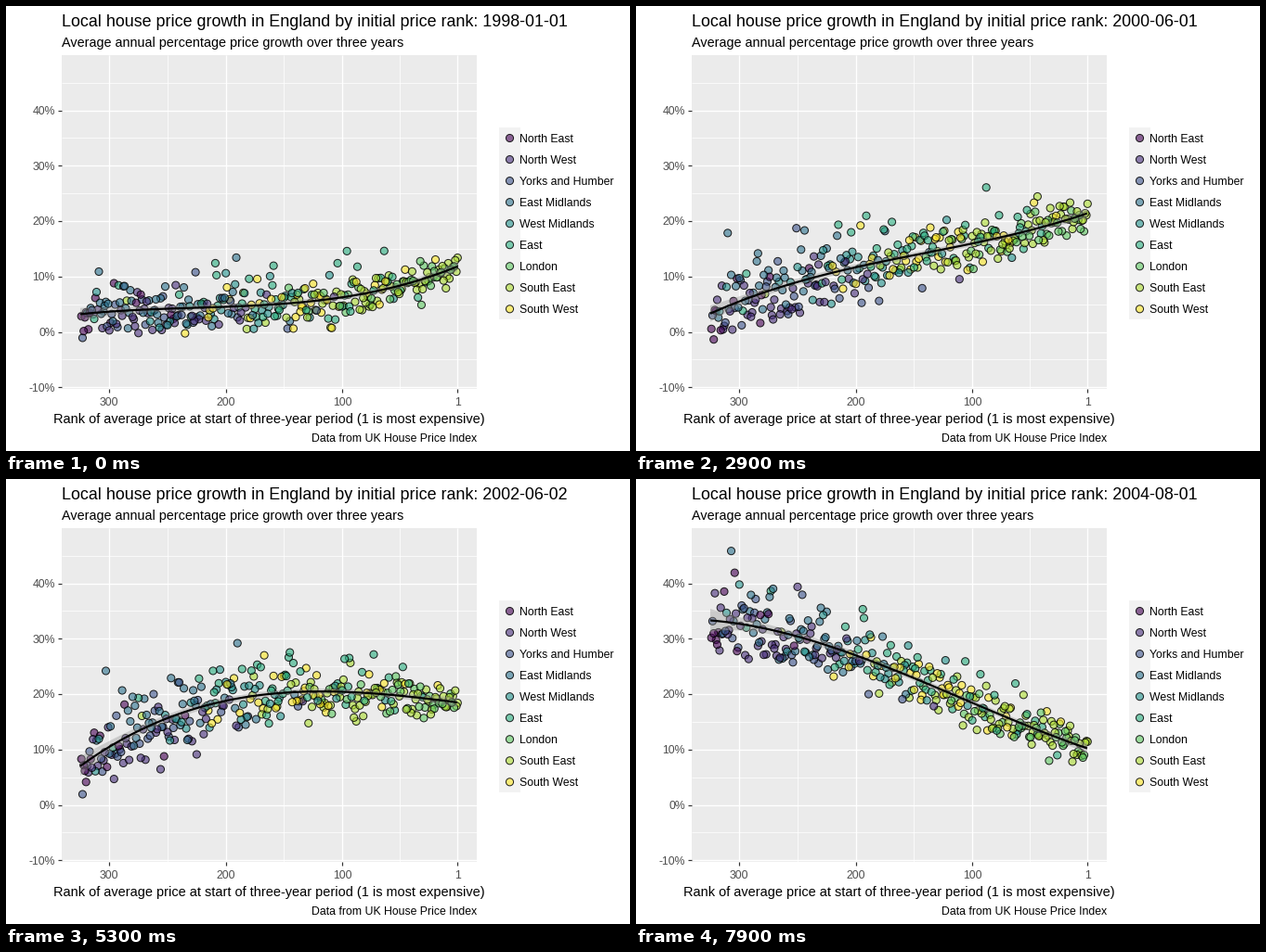
A matplotlib script that plays this animation: 672 by 480 pixels, repeating every 8 s.

```python
import numpy as np
import matplotlib.pyplot as plt
from matplotlib.animation import FuncAnimation
from matplotlib.patches import Rectangle

plt.rcParams["font.family"] = ["Liberation Sans", "DejaVu Sans"]

W, H, DPI = 672, 480, 96
PT = 72 / DPI
FRAMES = 80
T = np.arange(FRAMES)
rng = np.random.default_rng(11)

# name, number of districts, typical rank, typical growth against the trend
REGIONS = [
    ("North East", 12, 275, -2),
    ("North West", 39, 255, -3),
    ("Yorks and Humber", 21, 255, -2),
    ("East Midlands", 40, 235, .5),
    ("West Midlands", 30, 195, .3),
    ("East", 47, 150, 2),
    ("London", 32, 55, .5),
    ("South East", 67, 85, .7),
    ("South West", 36, 150, 1.5),
]
COLORS = plt.get_cmap("viridis")(np.linspace(0, 1, len(REGIONS)))

# Trend growth for the cheapest, middle and dearest districts at key months
KEYS = np.array([0, 12, 29, 41, 53, 62, 79])
CHEAP = [3.2, 3.2, 3.3, 3.2, 7, 12, 33.3]
MIDDLE = [4.9, 8.4, 13.3, 14.1, 20, 24.2, 24]
DEAR = [11.8, 14.7, 21.4, 17, 18.5, 13.7, 10.2]


def px(rank):
    return 486.3 - (rank - 1) * 1.2542


def py(pct):
    return 351.5 - 5.975 * pct


def unit(x):
    """Panel position as -1 (cheapest) to 1 (dearest)."""
    return (x - 283) / 203


def over_time(values):
    """Smooth Hermite path through the key values, sampled at every frame."""
    v = np.asarray(values, float)
    m = np.gradient(v, KEYS)
    k = np.clip(np.searchsorted(KEYS, T, "right") - 1, 0, len(KEYS) - 2)
    h = KEYS[k + 1] - KEYS[k]
    s = (T - KEYS[k]) / h
    return ((2 * s**3 - 3 * s**2 + 1) * v[k] + (s**3 - 2 * s**2 + s) * h * m[k]
            + (3 * s**2 - 2 * s**3) * v[k + 1] + (s**3 - s**2) * h * m[k + 1])


cheap, middle, dear = map(over_time, (CHEAP, MIDDLE, DEAR))


def trend(t, u):
    """Parabola through the three levels, with a slight S-bend."""
    slope = (dear[t] - cheap[t]) / 2
    bow = (dear[t] + cheap[t]) / 2 - middle[t]
    return middle[t] + slope * u + bow * u**2 + 2.2 * (u**3 - u)


def spread(t, u):
    return 1.5 + 1.1 * (1 - u**2) + np.maximum(-u, 0) * (.4 + t / 50)


def wobble(n):
    period, phase = rng.uniform(35, 90, n), rng.uniform(0, 2 * np.pi, n)
    return np.sqrt(2) * np.sin(2 * np.pi * T[:, None] / period + phase)


def build_districts():
    _, counts, home, lead = zip(*REGIONS)
    region = rng.permutation(np.repeat(np.arange(len(REGIONS)), counts))
    home, lead = np.array(home)[region], np.array(lead)[region]
    n = len(region)

    # Districts that grow faster than the trend climb the ranking
    score = (home + rng.normal(0, 52, n)
             - 8 * lead * T[:, None] / FRAMES + 5 * wobble(n))
    rank = score.argsort(axis=1).argsort(axis=1) + 1

    # Skewed upwards: a few districts run far ahead of the rest
    noise = (rng.gumbel(-.4, .7, n) + .6 * wobble(n)
             + rng.normal(0, .1, (FRAMES, n)))
    gap = .3 + .7 * np.sin(np.pi * T / FRAMES)
    growth = np.empty((FRAMES, n))
    for t in T:
        u = unit(px(rank[t]))
        rest = gap[t] * lead + noise[t] * spread(t, u)
        rest -= np.polyval(np.polyfit(u, rest, 4), u)
        growth[t] = trend(t, u) + rest
    return region, rank, growth


region, rank, growth = build_districts()

fig = plt.figure(figsize=(W / DPI, H / DPI), dpi=DPI, facecolor="white")
ax = fig.add_axes([0, 0, 1, 1])
ax.set(xlim=(0, W), ylim=(H, 0))
ax.axis("off")


def label(x, y, text, size, ha="left", color="black"):
    return ax.text(x, y, text, fontsize=size * PT, ha=ha, va="baseline",
                   color=color)


def line(x, y, color, width, z=1):
    return ax.plot(x, y, color=color, lw=width * PT, zorder=z,
                   solid_capstyle="butt")[0]


def dots(x, y, colors):
    fill = np.array(colors)
    fill[:, 3] = .6
    return ax.scatter(x, y, s=(8.1 * PT) ** 2, c=fill, linewidths=PT,
                      edgecolors=(0, 0, 0, .85), zorder=3)


def box(x0, y0, x1, y1, color):
    ax.add_patch(Rectangle((x0, y0), x1 - x0, y1 - y0, fc=color, lw=0, zorder=0))


L, R, TOP, BOTTOM = 60, 507, 53, 413
GREY = "#4D4D4D"
box(L, TOP, R, BOTTOM, "#EBEBEB")
for pct in range(-5, 50, 10):
    line([L, R], [py(pct)] * 2, "white", .7)
for r in (250, 150, 50.5):
    line([px(r)] * 2, [TOP, BOTTOM], "white", .7)
for pct in range(-10, 50, 10):
    y = py(pct)
    line([L, R], [y, y], "white", 1.4)
    line([L - 3.7, L], [y, y], "#333333", 1.2)
    label(53, y + 4.5, f"{pct}%", 12.2, "right", GREY)
for r in (300, 200, 100, 1):
    x = px(r)
    line([x, x], [TOP, BOTTOM], "white", 1.4)
    line([x, x], [BOTTOM, BOTTOM + 3.7], "#333333", 1.2)
    label(x, 431, str(r), 12.2, "center", GREY)

title = label(60, 22, "", 17.93)
label(60, 44, "Average annual percentage price growth over three years", 14.43)
label(283, 450, "Rank of average price at start of three-year period "
      "(1 is most expensive)", 14.55, "center")
label(R, 470, "Data from UK House Price Index", 12.2, "right")

KEY_H = 23.04
key_y = 142.5 + KEY_H * np.arange(len(REGIONS))
box(531, 131, 554, key_y[-1] + KEY_H / 2, "#F2F2F2")
dots(np.full(len(REGIONS), 542.5), key_y, COLORS)
for y, (name, *_) in zip(key_y, REGIONS):
    label(553, y + 4.5, name, 12.3)

points = dots(px(rank[0]), py(growth[0]), COLORS[region])
curve_x = np.linspace(80, 486, 120)
band = ax.fill(curve_x, curve_x, color="#999999", alpha=.4, lw=0, zorder=4)[0]
curve = line(curve_x, curve_x, "black", 2.2, 5)


def update(t):
    day = np.datetime64("1998-01-01") + int(t * 30.4375)
    title.set_text("Local house price growth in England by initial price "
                   f"rank: {day}")
    points.set_offsets(np.column_stack([px(rank[t]), py(growth[t])]))
    u = unit(curve_x)
    mid = trend(t, u)
    half = (.2 + .4 * u**6) * spread(t, u)
    edge = np.concatenate([mid + half, (mid - half)[::-1]])
    band.set_xy(np.column_stack([np.r_[curve_x, curve_x[::-1]], py(edge)]))
    curve.set_ydata(py(mid))
    return title, points, band, curve


anim = FuncAnimation(fig, update, frames=FRAMES, interval=100, repeat=True,
                     repeat_delay=0, blit=False)
plt.show()
```
